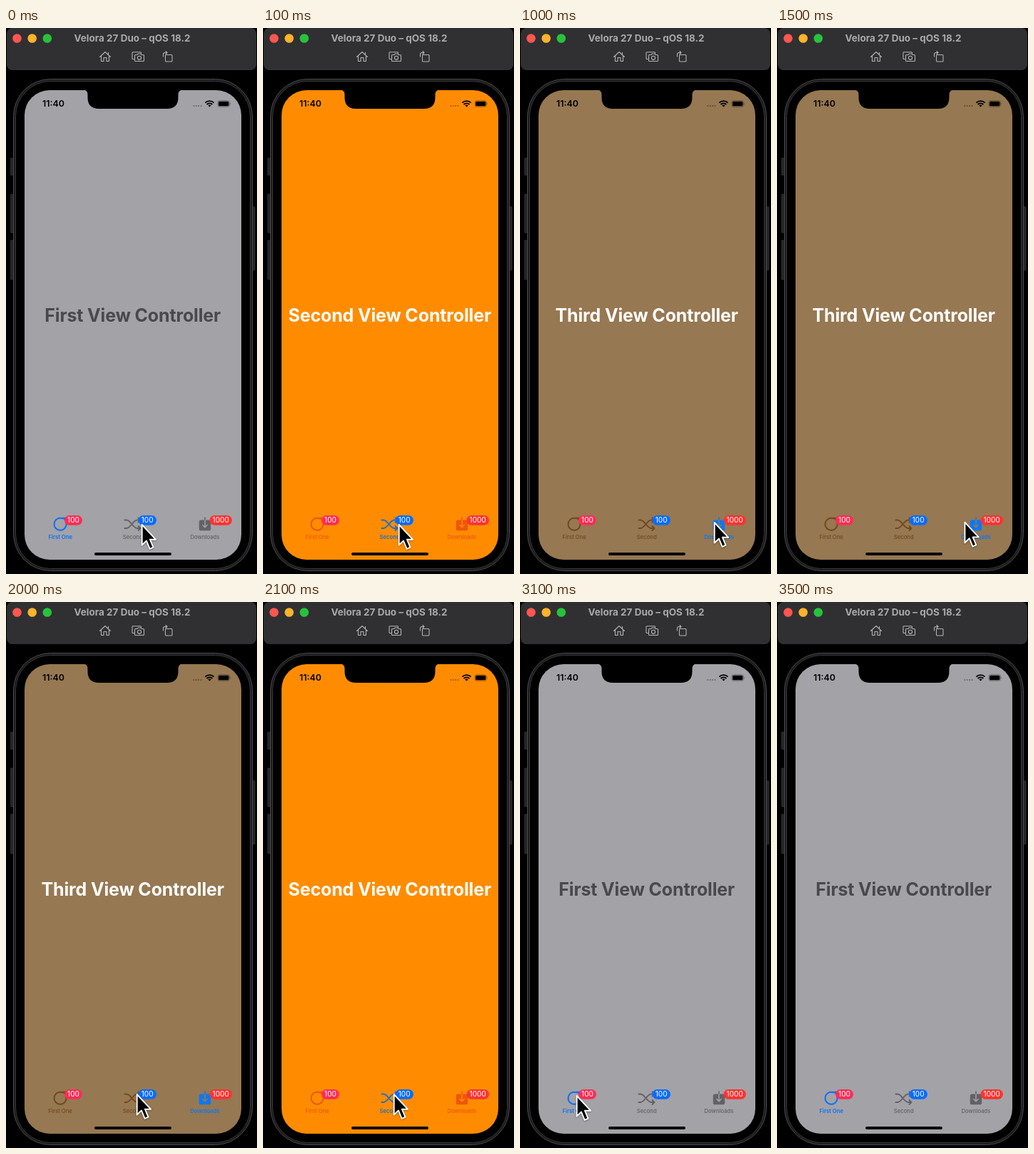
Write an HTML page that moves like this. It is 352 px wide and 764 px high and loops after 4700 ms.

```html
<!DOCTYPE html>
<html lang="en">
<head>
<meta charset="utf-8">
<title>Tab bar demo</title>
<style>
  html, body { margin: 0; width: 100%; height: 100%; overflow: hidden; background: #000; }
  svg { display: block; width: 352px; height: 764px; font-family: Inter, "Liberation Sans", sans-serif; }
  text { text-anchor: middle; }
  .line { fill: none; stroke-linecap: round; stroke-linejoin: round; }
  .tool { stroke: #b2b2b4; stroke-width: 1.1; }
  .bar { font-size: 13.5px; font-weight: 700; fill: #a9a9ab; }
  .clock { font-size: 12.4px; font-weight: 600; }
  .title { font-size: 25px; font-weight: 700; letter-spacing: -.15px; fill: var(--title); }
  .tab { color: var(--off); }
  .tab.on { color: var(--on); }
  .tab .line { stroke: currentColor; stroke-width: 1.9; }
  .tab .cut { stroke: var(--bg); stroke-width: 1.5; }
  .tab .label { font-size: 7.7px; font-weight: 500; fill: currentColor; }
  .tab.on .label { font-weight: 600; }
  .badge { font-size: 10.1px; fill: #fff; }
</style>
</head>
<body>
<svg id="stage" viewBox="0 0 352 764">
  <rect width="352" height="764"/>

  <!-- window bar -->
  <rect x="1" width="350" height="59" rx="8" fill="#303032"/>
  <circle cx="15.5" cy="14.5" r="6.3" fill="#ff5650"/>
  <circle cx="36.7" cy="14.5" r="6.3" fill="#fdb32a"/>
  <circle cx="57.8" cy="14.5" r="6.3" fill="#27c23c"/>
  <text class="bar" x="177" y="19.2">Velora 27 Duo – qOS 18.2</text>
  <g class="line tool">
    <path d="M131.5 40.5 139 33.5 146.500 40.500M133.500 39V46.500H137V41.500H141V46.500H144.500V39M143.500 36.500V34.200"/>
    <path d="M179.500 43.500H178Q177 43.500 177 42.500V34.800Q177 33.800 178 33.800H188.500Q189.500 33.800 189.500 34.800V35.500"/>
    <path d="M181.500 37.500H184L185 36H189L190 37.500H192.500Q193.500 37.500 193.500 38.500V45.500Q193.500 46.500 192.500 46.500H181.500Q180.500 46.500 180.500 45.500V38.500Q180.500 37.500 181.500 37.500Z"/>
    <circle cx="187" cy="41.800" r="2.600"/>
    <rect x="223.500" y="37.500" width="9.500" height="9.500" rx="1"/>
    <path d="M220.500 40V37Q220.500 34.500 223 34.500H226M224 32.500 226 34.500 224 36.500"/>
  </g>

  <!-- device -->
  <g fill="#252527" stroke="#39393b" stroke-width=".6">
    <rect x="6.300" y="182" width="5" height="24" rx="1"/>
    <rect x="6.300" y="232.500" width="5" height="54" rx="1"/>
    <rect x="6.300" y="297" width="5" height="55" rx="1"/>
    <rect x="344" y="250" width="5" height="89" rx="1"/>
  </g>
  <rect x="10.500" y="71.500" width="335" height="688" rx="52" fill="#1b1b1d" stroke="#4b4b4d"/>
  <rect x="13.500" y="74.500" width="329" height="682" rx="49" stroke="#38383a"/>
  <rect x="26" y="87" width="304" height="657" rx="35" fill="var(--bg)"/>
  <path d="M109 86.500Q114.500 87.500 114.500 93V97Q114.500 113 130.500 113H225.500Q241.500 113 241.500 97V93Q241.500 87.500 247 86.500Z"/>

  <!-- status -->
  <text class="clock" x="66.500" y="110.300">11:40</text>
  <g fill-opacity=".35">
    <circle cx="263.300" cy="109" r="1.100"/><circle cx="266.700" cy="109" r="1.100"/>
    <circle cx="270.100" cy="109" r="1.100"/><circle cx="273.500" cy="109" r="1.100"/>
  </g>
  <g class="line" stroke="#000" stroke-width="1.900" style="stroke-linecap:butt">
    <path d="M279.400 104.600A8.700 8.700 0 0 1 291.600 104.600M281.600 107A5.500 5.500 0 0 1 289.400 107"/>
  </g>
  <path d="M283.300 108.300Q285.500 106.700 287.700 108.300L285.500 110.600Z"/>
  <rect x="296.900" y="101.700" width="16.600" height="8.600" rx="2.500" fill="none" stroke="#000" stroke-opacity=".4" stroke-width=".8"/>
  <rect x="298" y="102.800" width="14.400" height="6.400" rx="1.500"/>
  <path d="M314.400 104.600Q316 106 314.400 107.500Z" fill-opacity=".45"/>

  <text class="title" id="title" x="177.700" y="410.500"></text>

  <!-- tabs -->
  <g class="tab">
    <path class="line" d="M79 686.300A8.500 8.500 0 1 0 84 691.300"/>
    <path d="M78 684.800H84V691Z" fill="currentColor"/>
    <text class="label" x="76.200" y="714.500">First One</text>
  </g>
  <g class="tab">
    <path class="line" d="M166.500 688.500H169C175 688.500 178 700 184 700H188M166.500 700H169C175 700 178 688.500 184 688.500H188M185.500 685.500 188.500 688.500 185.500 691.500M185.500 697 188.500 700 185.500 703"/>
    <text class="label" x="177.700" y="714.500">Second</text>
  </g>
  <g class="tab">
    <rect x="270.800" y="688.500" width="16.400" height="14.800" rx="2.600" fill="currentColor"/>
    <path class="line" style="stroke-width:1.500" d="M279 685V688"/>
    <path class="line cut" d="M279 689V698.500M275.800 695.500 279 698.700 282.200 695.500"/>
    <text class="label" x="279" y="714.500">Downloads</text>
  </g>
  <g class="badge">
    <rect x="82" y="682" width="25" height="13.700" rx="6.850" fill="#ff2d55"/>
    <text x="94.500" y="692.400">100</text>
    <rect x="185.500" y="682" width="25.500" height="13.700" rx="6.850" fill="#0a6cff"/>
    <text x="198.200" y="692.400">100</text>
    <rect x="285.500" y="682" width="31.500" height="13.700" rx="6.850" fill="#ff3330"/>
    <text x="301.200" y="692.400">1000</text>
  </g>
  <rect x="124" y="734" width="108" height="4" rx="2" fill="#080808"/>

  <path id="cursor" d="M.700 1V29.500L7 23.500 11.700 34.800 16.500 32.700 11.900 21.700H20Z" fill="#000" stroke="#fff" stroke-width="1.900" stroke-linejoin="round" style="filter:drop-shadow(0 1px 1px rgba(0,0,0,.35))"/>
</svg>
<script>
const LOOP = 4700, TICK = 100, LEAVE = 3500;

const views = [
  { name: 'First', bg: '#a3a2a7', title: '#49484d', off: '#626166', on: '#0a70f5' },
  { name: 'Second', bg: '#ff8c00', title: '#fff', off: '#ee560a', on: '#1b70c8' },
  { name: 'Third', bg: '#967852', title: '#fff', off: '#70491d', on: '#0a78f5' }
];

// [time, view]
const taps = [[0, 0], [100, 1], [1000, 2], [2100, 1], [3100, 0]];

// [time, x, y]
const path = [
  [0, 190, 694], [200, 190, 694], [600, 275, 694], [700, 272, 691],
  [1400, 272, 691], [1900, 183, 688], [2500, 183, 688],
  [2900, 79, 690], [3200, 79, 690], [3400, 325, 619]
];

const stage = document.getElementById('stage');
const title = document.getElementById('title');
const cursor = document.getElementById('cursor');
const tabs = stage.querySelectorAll('.tab');
let shown = -1;

function show(index) {
  if (index === shown) return;
  shown = index;
  const view = views[index];
  for (const key of ['bg', 'title', 'off', 'on']) stage.style.setProperty('--' + key, view[key]);
  title.textContent = view.name + ' View Controller';
  tabs.forEach((tab, i) => tab.classList.toggle('on', i === index));
}

function pointAt(t) {
  const next = path.findIndex(p => p[0] > t);
  if (next < 0) return path[path.length - 1].slice(1);
  const a = path[next - 1], b = path[next];
  const k = (t - a[0]) / (b[0] - a[0]);
  const ease = k * k * (3 - 2 * k);
  return [1, 2].map(i => a[i] + (b[i] - a[i]) * ease);
}

function draw(ms) {
  const t = Math.floor((ms % LOOP) / TICK) * TICK;
  show(taps.filter(tap => tap[0] <= t).pop()[1]);
  cursor.setAttribute('transform', `translate(${pointAt(t)})`);
  cursor.setAttribute('visibility', t < LEAVE ? 'visible' : 'hidden');
}

const start = performance.now();
function frame() {
  draw(performance.now() - start);
  requestAnimationFrame(frame);
}
frame();
</script>
</body>
</html>
```
